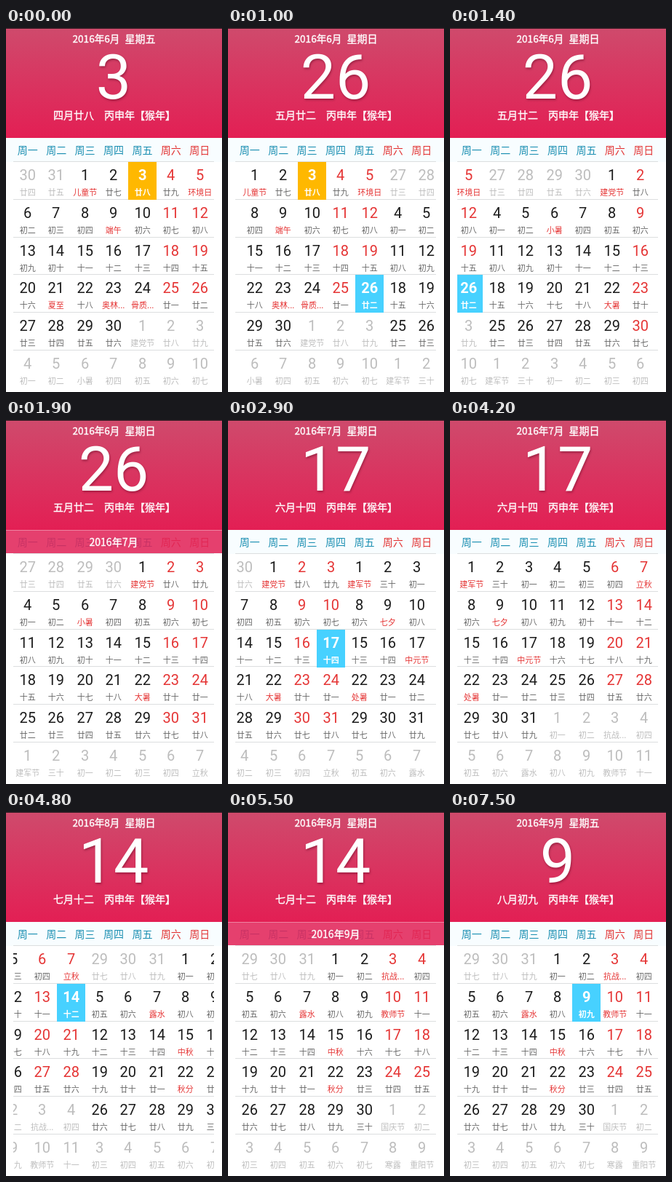
An HTML page that plays this animation: 297 by 500 pixels, repeating every 8 s.

```html
<!DOCTYPE html>
<html lang="zh-CN">
<head>
<meta charset="utf-8">
<title>日历</title>
<style>
html, body { margin: 0; width: 100%; height: 100%; overflow: hidden; background: #fff; }
svg { display: block; }
text { text-anchor: middle; font: 14px "Noto Sans CJK SC", "Noto Sans CJK", "Noto Sans", sans-serif; }
.head text { fill: #fff; stroke: #fff; stroke-width: .35px; }
.head .left { text-anchor: start; }
.head #date { font-size: 13.6px; }
.head .big { font: 86px Roboto, Arial, sans-serif; stroke: none; filter: drop-shadow(1px 2px 1.5px rgba(80, 0, 25, .4)); }
.week text { fill: #1b8fb2; }
.week .rest { fill: #e23434; }
.cell rect { fill: none; }
.cell text { font-size: 11px; fill: #666; }
.cell .num { font: 20px Roboto, Arial, sans-serif; fill: #1c1c1c; }
.cell.rest .num, .cell .fest { fill: #e53535; }
.cell.other .num, .cell.other .lunar { fill: #bdbdbd; }
.cell.today rect { fill: #ffb800; }
.cell.picked:not(.today) rect { fill: #47d1ff; }
.cell.today text.lunar, .cell.picked text.lunar,
.cell.today text.num, .cell.picked text.num { fill: #fff; font-weight: bold; }
</style>
</head>
<body>
<svg id="stage" width="100%" height="100%" viewBox="0 0 297 500">
  <defs>
    <linearGradient id="pink" x1="0" y1="0" x2="0" y2="1">
      <stop offset="0" stop-color="#cf4a6c"/>
      <stop offset="1" stop-color="#e31f54"/>
    </linearGradient>
  </defs>
  <g class="head">
    <rect width="297" height="151" fill="url(#pink)"/>
    <rect width="297" height="1" fill="#2a1a20"/>
    <text id="date" class="left" x="91.500" y="20"></text>
    <text id="weekday" class="left" x="163.500" y="20"></text>
    <text id="big" class="big" x="148" y="97"></text>
    <text id="lunar" class="left" x="65" y="125"></text>
    <text class="left" x="135" y="125">丙申年【猴年】</text>
  </g>
  <rect y="151" width="297" height="33" fill="#f8fdff"/>
  <g id="week" class="week"></g>
  <path id="rules" stroke="#dcdedf" fill="none"/>
  <svg x="10" y="184" width="276" height="316" overflow="hidden"><g id="pages"></g></svg>
  <g id="banner" class="head">
    <rect y="151" width="297" height="32" fill="#e32459" opacity=".87"/>
    <rect y="151" width="297" height="1" fill="#fff" opacity=".35"/>
    <text id="title" x="148" y="172.500"></text>
  </g>
</svg>
<script>
const LOOP = 8000, STEP = 100, PAGE = 276, COL = PAGE / 7, ROW = 51.8, DAY = 864e5;
const WEEK = '一二三四五六日', NUMS = '一二三四五六七八九十';
const FESTIVALS = {
  '6-1': '儿童节', '6-5': '环境日', '6-9': '端午', '6-21': '夏至', '6-23': '奥林...', '6-24': '骨质...',
  '7-1': '建党节', '7-6': '小暑', '7-22': '大暑',
  '8-1': '建军节', '8-7': '立秋', '8-9': '七夕', '8-17': '中元节', '8-22': '处暑',
  '9-3': '抗战...', '9-7': '露水', '9-10': '教师节', '9-15': '中秋', '9-22': '秋分',
  '10-1': '国庆节', '10-8': '寒露', '10-9': '重阳节'
};
const day = (m, d) => Date.UTC(2016, m - 1, d) / DAY;
const weekIndex = n => (new Date(n * DAY).getUTCDay() + 6) % 7;
// First days of lunar months four to nine
const MOONS = [[5, 7], [6, 5], [7, 4], [8, 3], [9, 1], [10, 1]].map(([m, d]) => day(m, d));
const MONTHS = [6, 7, 8, 9];

// When each day becomes the chosen one
const PICKS = [[0, 6, 3], [800, 6, 26], [2700, 7, 17], [4400, 8, 14], [6500, 9, 1], [7500, 9, 9]];
// Page turns: start, first visible move, end, bend of the easing
const SLIDES = [[700, 800, 1600, 1], [2600, 2700, 3400, .772], [4300, 4400, 5200, .88]];
// Month banner: fade start, end, month
const BANNERS = [[1700, 2300, 7], [3500, 4200, 8], [5300, 6000, 9]];

const $ = id => document.getElementById(id);

function add(parent, tag, attrs, text) {
  const el = document.createElementNS('http://www.w3.org/2000/svg', tag);
  for (const k in attrs) el.setAttribute(k, attrs[k]);
  if (text) el.textContent = text;
  return parent.appendChild(el);
}

function lunarMonth(n) {
  let i = MOONS.length - 1;
  while (i > 0 && MOONS[i] > n) i--;
  return i;
}

function lunarDay(n) {
  const k = n - MOONS[lunarMonth(n)];
  if (k === 29) return '三十';
  return (k === 9 ? '初' : k === 19 ? '廿' : '初十廿'[Math.floor(k / 10)]) + NUMS[k % 10];
}

const cells = {};

function buildPage(month, index) {
  const page = add($('pages'), 'g', { transform: `translate(${index * PAGE})` });
  const first = day(month, 1);
  const start = first - weekIndex(first);
  for (let i = 0; i < 42; i++) {
    const date = new Date((start + i) * DAY);
    const m = date.getUTCMonth() + 1, d = date.getUTCDate(), key = m + '-' + d;
    const own = m === month, fest = FESTIVALS[key];
    const cls = ['cell', own ? '' : 'other', i % 7 > 4 ? 'rest' : '', own && key === '6-3' ? 'today' : ''];
    const cell = add(page, 'g', {
      class: cls.filter(Boolean).join(' '),
      transform: `translate(${Math.round(i % 7 * COL)} ${Math.round(Math.floor(i / 7) * ROW)})`
    });
    add(cell, 'rect', { width: Math.round(COL), height: Math.round(ROW) });
    add(cell, 'text', { class: 'num', x: COL / 2, y: 25 }, String(d));
    add(cell, 'text', { class: fest ? 'lunar fest' : 'lunar', x: COL / 2, y: 45.5 }, fest || lunarDay(start + i));
    if (own) cells[key] = cell;
  }
}

[...WEEK].forEach((c, i) => add($('week'), 'text',
  { x: 10 + COL * (i + .5), y: 173, class: i > 4 ? 'rest' : '' }, '周' + c));
$('rules').setAttribute('d', Array.from({ length: 6 }, (_, i) => `M10 ${Math.round(184 + i * ROW) - .5}h${PAGE}`).join(''));
MONTHS.forEach(buildPage);

let picked;

function pick(m, d) {
  const cell = cells[m + '-' + d];
  if (cell === picked) return;
  if (picked) picked.classList.remove('picked');
  cell.classList.add('picked');
  picked = cell;
  const n = day(m, d);
  $('date').textContent = `2016年${m}月`;
  $('weekday').textContent = '星期' + WEEK[weekIndex(n)];
  $('big').textContent = d;
  $('lunar').textContent = NUMS[lunarMonth(n) + 3] + '月' + lunarDay(n);
}

function slide(t, [from, show, to, bend]) {
  if (t < show) return 0;
  const u = Math.min(1, (t - from) / (to - from)) ** bend;
  return u * u * (3 - 2 * u);
}

function render(time) {
  const t = Math.floor(time % LOOP / STEP) * STEP;
  const [, m, d] = PICKS.filter(p => p[0] <= t).pop();
  pick(m, d);
  const turn = SLIDES.reduce((sum, s) => sum + slide(t, s), 0);
  $('pages').setAttribute('transform', `translate(${-Math.round(turn * PAGE)})`);
  const b = BANNERS.find(([from, to]) => t >= from && t < to);
  $('banner').setAttribute('opacity', b ? Math.min(1, (t - b[0] + STEP) / 300) : 0);
  if (b) $('title').textContent = `2016年${b[2]}月`;
}

const began = performance.now();
function tick() {
  render(performance.now() - began);
  requestAnimationFrame(tick);
}
tick();
</script>
</body>
</html>
```
